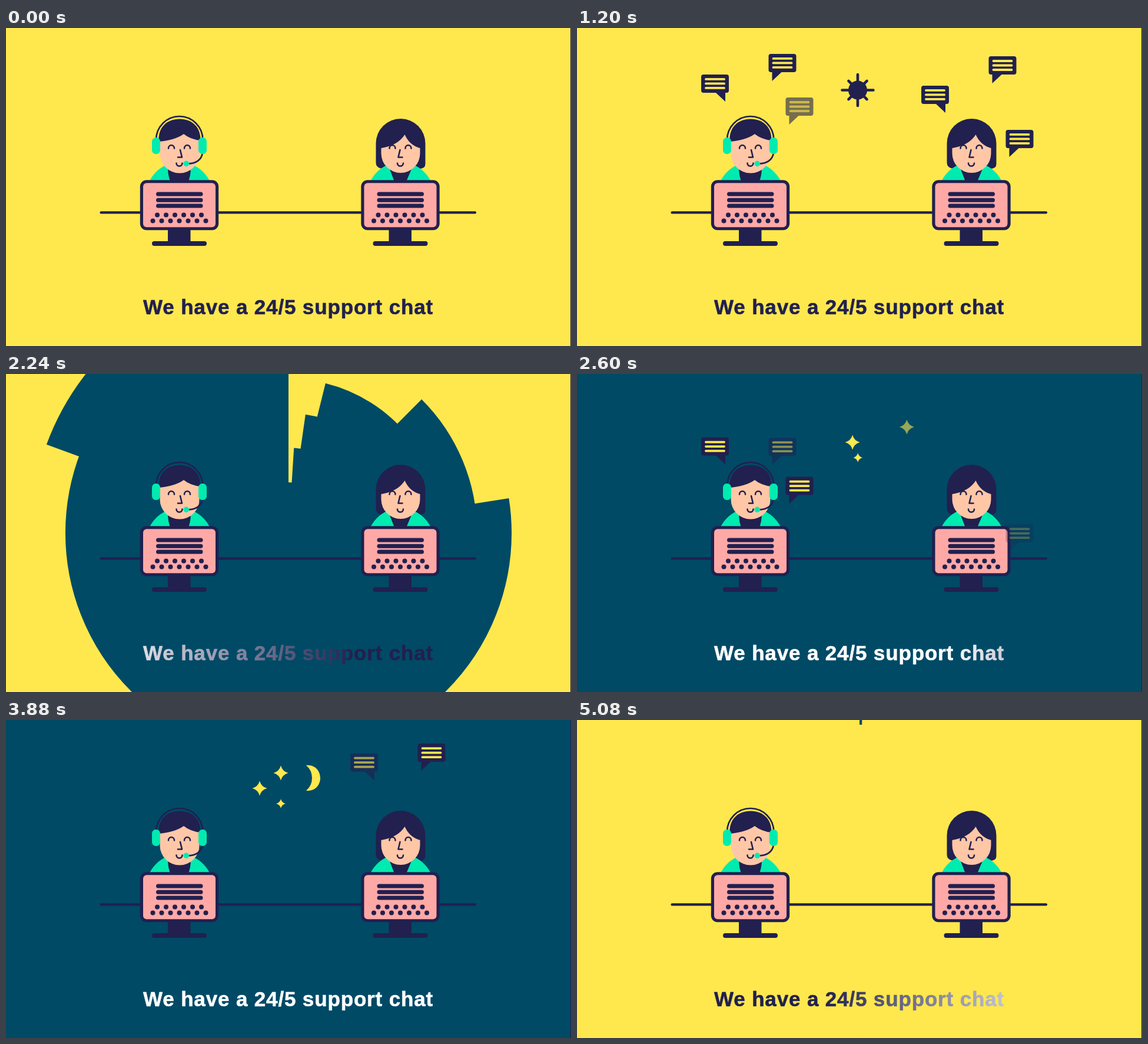
An HTML page with a canvas for the animation above (5120 ms loop, 960 by 540 pixels).

```html
<!DOCTYPE html>
<html lang="en">
<head>
<meta charset="utf-8">
<title>Support chat</title>
<style>
  html, body { margin: 0; width: 100%; height: 100%; overflow: hidden; background: #ffe84d; }
  canvas, svg { position: absolute; left: 0; top: 0; width: 960px; height: 540px; }
  text { font: bold 35px "Liberation Sans", Arial, sans-serif; letter-spacing: .85px; }
</style>
</head>
<body>
<canvas id="stage" width="960" height="540"></canvas>
<svg viewBox="0 0 960 540">
  <linearGradient id="ink" gradientUnits="userSpaceOnUse" y1="0" y2="0">
    <stop id="inkNew" offset="0"/>
    <stop id="inkOld" offset="1"/>
  </linearGradient>
  <text x="233" y="486" fill="url(#ink)" stroke="url(#ink)" stroke-width=".6" stroke-linejoin="round">We have a 24/5 support chat</text>
</svg>
<script>
const LOOP = 5120, NIGHT_DELAY = 2240;
const YELLOW = '#ffe84d', NAVY = '#21204f', TEAL = '#004a66',
      PINK = '#ffa9a6', SKIN = '#ffc7a6', MINT = '#00ebb0';
const ctx = document.getElementById('stage').getContext('2d');
const byId = id => document.getElementById(id);

// --- drawing helpers ---
function fill(color, path) {
  ctx.fillStyle = color;
  ctx.fill(new Path2D(path));
}
function stroke(color, width, path) {
  ctx.strokeStyle = color;
  ctx.lineWidth = width;
  ctx.lineCap = ctx.lineJoin = 'round';
  ctx.stroke(new Path2D(path));
}
function disc(color, x, y, r) {
  ctx.fillStyle = color;
  ctx.beginPath();
  ctx.arc(x, y, r, 0, 2 * Math.PI);
  ctx.fill();
}
function box(color, x, y, w, h, r = 0) {
  ctx.fillStyle = color;
  ctx.beginPath();
  ctx.roundRect(x, y, w, h, r);
  ctx.fill();
}
function at(x, y, draw) {
  ctx.save();
  ctx.translate(x, y);
  draw();
  ctx.restore();
}

// --- clock wipe made of staggered rings ---
const WIPES = [
  { start: 1636, color: TEAL, ink: '#fff', oldInk: NAVY },
  { start: 4280, color: YELLOW, ink: NAVY, oldInk: '#fff' }
];
const STEP = 54, CORE = 27.5, RING = 58.6;
// [step, swept degrees]
const SWEEP = [[.75, 0], [2, 11.9], [3.1, 21.5], [4, 37], [4.12, 67], [4.2, 69], [5, 270],
               [6, 314], [6.2, 315], [7.15, 345.8], [8.15, 351.6], [9.8, 359], [10.2, 360]];

function sweepAt(k) {
  const i = SWEEP.findIndex(p => p[0] > k);
  if (i === 0) return 0;
  if (i < 0) return 360;
  const [k0, a0] = SWEEP[i - 1], [k1, a1] = SWEEP[i];
  return a0 + (a1 - a0) * (k - k0) / (k1 - k0);
}
function drawWipe(t, { start, color }) {
  for (let n = 0; n < 10; n++) {
    const sweep = sweepAt((t - start) / STEP - n);
    const inner = n ? CORE + RING * (n - 1) - 1 : 0, outer = CORE + RING * n;
    if (sweep === 0) continue;
    // A complete ring always encloses complete rings, so a disc avoids seams.
    if (sweep === 360) {
      disc(color, 480, 270, outer);
      continue;
    }
    const top = -Math.PI / 2;
    ctx.strokeStyle = color;
    ctx.lineCap = 'butt';
    ctx.lineWidth = outer - inner;
    ctx.beginPath();
    ctx.arc(480, 270, (inner + outer) / 2, top, top - sweep * Math.PI / 180, true);
    ctx.stroke();
  }
}

// --- desk and people ---
function monitor() {
  box(NAVY, 275, 340, 38.5, 25);
  stroke(NAVY, 8, 'M252 366H337');
  box(NAVY, 227.8, 258.2, 133.4, 85, 11);
  box(PINK, 233, 263.2, 123, 75, 6);
  for (const y of [282, 292.3, 302]) stroke(NAVY, 7, `M258.5 ${y}H331`);
  for (let i = 0; i < 6; i++) disc(NAVY, 257 + 15 * i, 317.5, 4);
  for (let i = 0; i < 7; i++) disc(NAVY, 249.5 + 15 * i, 327.5, 4);
}
function shoulders(collar) {
  disc(MINT, 295, 285, 57);
  fill(NAVY, collar);
}
function face(noseSide) {
  const n = x => 295 + noseSide * x;
  stroke(NAVY, 2.6, 'M276 204.5a5 5.5 0 0 1 10 0M303 204.5a5 5.5 0 0 1 10 0M289.5 229.5a5 5 0 0 0 10 0');
  stroke(NAVY, 2.6, `M${n(1)} 207L${n(4)} 219.5H${n(-3)}`);
}
function agent() {
  shoulders('M275 236H314Q314 252 309 262H280Q275 252 275 236Z');
  fill(SKIN, 'M261.5 180H328.5V213a33.5 33.5 0 0 1 -67 0Z');
  fill(NAVY, 'M259.5 193C258 168 274 154.5 295 154.5S331 168 330.5 191Q313 189 302 180Q287 190.500 259.5 193Z');
  stroke(NAVY, 2.6, 'M255 190a39.7 40 0 0 1 79.4 0M334 212Q331 230 308 230.5');
  box(MINT, 248, 186, 14, 28, 6.5);
  box(MINT, 327, 186, 14, 28, 6.5);
  face(1);
  disc(MINT, 306.3, 230.3, 4.8);
}
function customer() {
  fill(NAVY, 'M253 196a42 42 0 0 1 84 0V231Q337 239 326 239H264Q253 237 253 229Z');
  shoulders('M275 236H315L304 262H285Z');
  fill(SKIN, 'M262 204Q291 199 302 181Q310 199 328 204V213a33 33 0 0 1 -66 0Z');
  face(-1);
}
function scene() {
  stroke(NAVY, 4.2, 'M161.5 313.4H797');
  at(0, 0, () => { agent(); monitor(); });
  at(375.5, 0, () => { customer(); monitor(); });
}

// --- floating items: fade and slide in, drift, fade and slide out ---
const FADE = 320;
function smooth(p) {
  p = Math.min(1, Math.max(0, p));
  return p * p * (3 - 2 * p);
}
function float(t, item, distance, draw) {
  const shown = smooth((t - item.from) / FADE), gone = smooth((t - item.to) / FADE);
  const alpha = shown * (1 - gone);
  if (alpha <= 0) return;
  const shift = distance * (1 - shown - gone) - item.drift * (t - item.time);
  ctx.globalAlpha = alpha;
  draw(shift);
  ctx.globalAlpha = 1;
}

const bubble = (x, y, tailRight, from, to, drift = .034) =>
  ({ x, y, tailRight, from, to, drift, time: 1200 });
const BUBBLES = [
  bubble(211, 79, true, 40, 1240),
  bubble(325.5, 44, false, 200, 1220),
  bubble(354.5, 146, false, 40, 1065),
  bubble(585, 98, true, 400, 1510),
  bubble(699.5, 48, false, 520, 1730, .018),
  bubble(728.5, 173, false, 255, 1260)
];
function drawBubble(b) {
  fill(NAVY, 'M4 0H43Q47 0 47 4V27Q47 31 43 31H' + (b.tailRight
    ? '41V46L25 31H4Q0 31 0 27V4Q0 0 4 0Z'
    : '22L6 46V31H4Q0 31 0 27V4Q0 0 4 0Z'));
  for (const y of [8, 15.5, 23]) stroke(YELLOW, 3.8, `M8 ${y}H39`);
}
function drawBubbles(t) {
  for (const b of BUBBLES) {
    float(t, b, 72, shift => at(b.x, b.y + shift, () => drawBubble(b)));
  }
}

function sun() {
  disc(NAVY, 0, 0, 16);
  let rays = '';
  for (let i = 0; i < 8; i++) {
    const a = i * Math.PI / 4, far = i % 2 ? 22 : 26.5;
    rays += `M0 0L${far * Math.cos(a)} ${far * Math.sin(a)}`;
  }
  stroke(NAVY, 4.6, rays);
}
const moon = () => fill(YELLOW, 'M-2 -21.5C14 -23 22 -11 22 0S14 23 -2 21.5Q8 13 8 0Q8 -13 -2 -21.5Z');
const star = r => () => {
  const c = r * .22;
  fill(YELLOW, `M0 ${-r}Q${c} ${-c} ${r} 0Q${c} ${c} 0 ${r}Q${-c} ${c} ${-r} 0Q${-c} ${-c} 0 ${-r}Z`);
};
const DAY_SKY = [
  { x: 477, y: 105.5, from: 300, to: 1746, drift: .025, time: 1200, draw: sun }
];
const NIGHT_SKY = [
  { x: 467, y: 90, from: 180, to: 2250, drift: .029, time: 1640, draw: star(12.5) },
  { x: 431, y: 116, from: 40, to: 2180, drift: .029, time: 1640, draw: star(12.5) },
  { x: 467, y: 142, from: 40, to: 2220, drift: .008, time: 1640, draw: star(7.8) },
  { x: 512, y: 98.5, from: 480, to: 2416, drift: .012, time: 1640, draw: moon }
];
function drawSky(t, items) {
  for (const s of items) float(t, s, 140, shift => at(s.x + shift, s.y, s.draw));
}

// --- caption colour sweeps from left to right ---
function colorCaption(t) {
  const wipe = WIPES[t < WIPES[1].start ? 0 : 1];
  const head = 230 + 1.28 * (t - wipe.start - 324);
  byId('ink').setAttribute('x1', head - 420);
  byId('ink').setAttribute('x2', head);
  byId('inkNew').setAttribute('stop-color', wipe.ink);
  byId('inkOld').setAttribute('stop-color', wipe.oldInk);
}

function frame(now) {
  const t = now % LOOP;
  box(YELLOW, 0, 0, 960, 540);
  for (const wipe of WIPES) drawWipe(t, wipe);
  drawSky(t, DAY_SKY);
  drawSky(t - NIGHT_DELAY, NIGHT_SKY);
  scene();
  drawBubbles(t);
  drawBubbles(t - NIGHT_DELAY);
  box(NAVY, 959, 0, 1, 540);
  colorCaption(t);
  requestAnimationFrame(frame);
}
requestAnimationFrame(frame);
</script>
</body>
</html>
```
